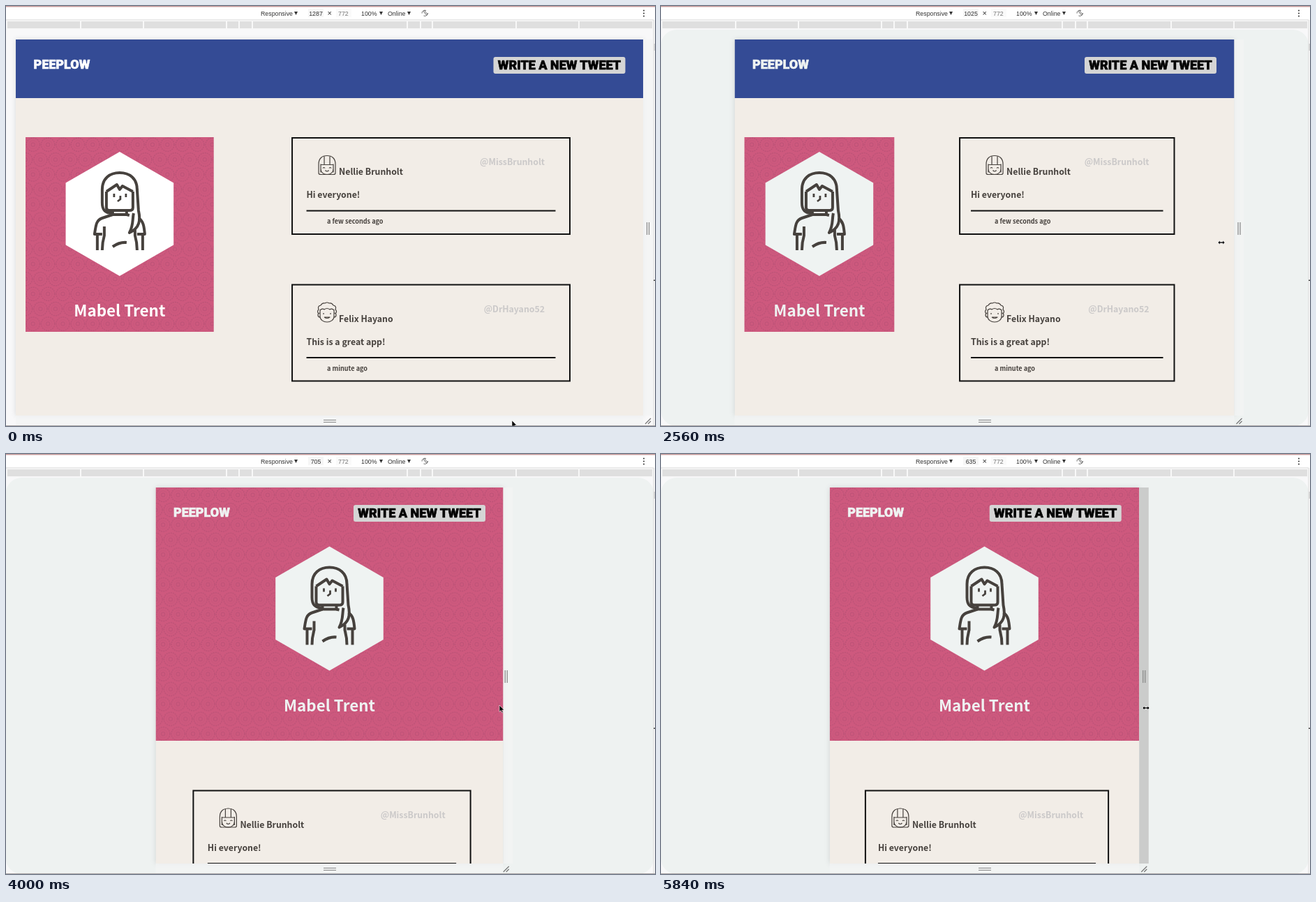
Write an HTML page that moves like this. It is 930 by 602 pixels and loops after 5.92 s.

```html
<!DOCTYPE html>
<html lang="en">
<head>
<meta charset="utf-8">
<title>Responsive page</title>
<style>
  html, body { margin: 0; width: 100%; height: 100%; overflow: hidden; background: #f8f8f9; }
  svg { display: block; position: absolute; left: 0; top: 0; }
  .tool { font: 8.8px "Liberation Sans", Arial, sans-serif; fill: #333; }
  .body { font: 700 12.3px "Noto Sans CJK JP", "Noto Sans CJK SC", "Noto Sans CJK", "Open Sans", sans-serif; fill: #46413d; }
  .body .when { font-size: 9.1px; }
  .body .handle { fill: #cbc9c9; text-anchor: end; }
  .body .person { font-size: 22.4px; text-anchor: middle; }
  .loud { font: 900 18px Roboto, "Open Sans", sans-serif; stroke-width: .6; }
  .ink { fill: none; stroke: #46413d; stroke-linejoin: round; }
</style>
</head>
<body>
<svg width="930" height="602" viewBox="0 0 930 602">
  <defs>
    <pattern id="rosettes" width="21.4" height="42.8" patternUnits="userSpaceOnUse">
      <rect width="22" height="43" fill="#ce597e"/>
      <g id="rings" fill="none" stroke="#b44f73"></g>
    </pattern>
    <clipPath id="screen"><rect id="screenRect" y="48" height="539"/></clipPath>
    <filter id="soft" x="-10%" y="-10%" width="120%" height="120%"><feGaussianBlur stdDeviation="3.5"/></filter>
    <g id="woman" class="ink" stroke-width="4">
      <path d="M-11 88C-22 88-25 82-25 73V54C-25 38-14 30 0 30S25 38 25 54L27 84C30 98 29 109 14 116C20 105 18 98 20 88"/>
      <path d="M-19 57V80Q-19 84-15 84H14Q19 84 19 80V57M-19 57L-4 47L0 54L4 49L19 57M-10 85V90H10V85"/>
      <path d="M-10 90L-25 95C-34 98-34 106-36 118H-25M10 90L14 91M27 95C34 99 35 107 36 118H25"/>
      <path d="M-32 118V141M-22 107V120Q-25 130-25 141M33 118V141M22 112V120Q25 130 25 141M-10 136Q0 129 10 130"/>
      <path d="M-8 60V65M9 60V65M1 63V68L-3 71" stroke-width="2.8"/>
    </g>
    <g id="girl" class="ink" stroke-width="1.2">
      <path d="M-12 11V-2C-12-10-7-14 0-14S12-10 12-2V11Q12 13 9 13H-9Q-12 13-12 11"/>
      <path d="M-9-2V5C-9 10-5 13 0 13S9 10 9 5V-2M-9-1H9M-4-13V-1M4-13V-1M-9 1V10M9 1V10"/>
      <path d="M-6 4Q-4.500 2-3 4M3 4Q4.500 2 6 4M-2.500 7Q0 10 2.500 7"/>
    </g>
    <g id="boy" class="ink" stroke-width="1.2">
      <path d="M-12 2Q-15-1-12-4Q-14-9-9-10Q-7-14-3-13Q0-15 3-13Q7-14 9-10Q14-9 12-4Q15-1 12 2"/>
      <path d="M-10-3Q-7-6-4-4Q0-7 4-4Q7-6 10-3V6C10 11 5 14 0 14S-10 11-10 6ZM-10 1Q-13 1-13 4T-10 7M10 1Q13 1 13 4T10 7"/>
      <path d="M-5 1V3M5 1V3M-4 7H4Q0 10-4 7"/>
    </g>
  </defs>

  <rect width="930" height="602" fill="#f8f8f9"/>
  <rect id="backdrop" y="34" width="928" height="568" rx="22" fill="#eef2f1"/>
  <g id="chrome"></g>
  <g id="view"></g>
</svg>

<script>
const LOOP = 5920, STEP = 80, SCALE = 0.6985, MID = 463.5;
const $ = id => document.getElementById(id);

// [time, device width]
const widths = [[480, 1287], [640, 1283], [1280, 1247], [1840, 1180], [1920, 1167], [2480, 1025],
  [2560, 1025], [3360, 805], [3440, 801], [3760, 757], [3920, 713], [4000, 705], [4400, 666],
  [4720, 643], [4800, 641], [5040, 640], [5360, 635]];
// [time, x, y]
const pointer = [[0, 725, 594], [400, 920, 322], [560, 918, 322], [1280, 896, 325], [1920, 857, 329],
  [2560, 803, 339], [3440, 746, 352], [4000, 707, 360], [4800, 695, 362], [5360, 695, 364]];

function at(keys, t, col = 1) {
  if (t <= keys[0][0]) return keys[0][col];
  const i = keys.findIndex(k => k[0] >= t);
  if (i < 0) return keys[keys.length - 1][col];
  const a = keys[i - 1], b = keys[i];
  return a[col] + (b[col] - a[col]) * (t - a[0]) / (b[0] - a[0]);
}

const rect = (x, y, w, h, fill, more = '') =>
  `<rect x="${x}" y="${y}" width="${w}" height="${h}" fill="${fill}" ${more}/>`;
const text = (x, y, s, more = '') => `<text x="${x}" y="${y}" ${more}>${s}</text>`;
const line = (d, stroke, w, more = '') => `<path d="${d}" fill="none" stroke="${stroke}" stroke-width="${w}" ${more}/>`;
const use = (id, x, y) => `<use href="#${id}" x="${x}" y="${y}"/>`;

$('rings').innerHTML = [[10.7, 10.7], [0, 32.1], [21.4, 32.1]].map(([x, y]) =>
  `<circle cx="${x}" cy="${y}" r="9.6" stroke-width="1.5" stroke-dasharray="2 1.2" opacity=".75"/>
   <circle cx="${x}" cy="${y}" r="6" opacity=".35"/>
   <circle cx="${x}" cy="${y}" r="2.6" stroke-width="1.2" opacity=".6"/>`).join('');

function drawChrome() {
  const down = x => `<path d="M${x - 2.5} 8H${x + 2.5}L${x} 13Z" fill="#333"/>`;
  const stops = [1, 107, 197, 316, 334, 353, 575, 594, 611, 731, 821, 927];
  const bars = stops.slice(1).map((x, i) => rect(stops[i] + 1, 22, x - stops[i] - 2, 10, '#dfdfdf')).join('');
  $('chrome').innerHTML =
    rect(0, 0, 930, 20, '#fff') + rect(0, 0, 930, 1.4, '#c79a9a') + rect(0, 19.5, 928, 1, '#d2d2d2') +
    rect(0, 20.5, 928, 13, '#f8f8f8') + bars +
    rect(433, 4, 22, 12, '#f6f6f6') + rect(473, 4, 22, 12, '#fafafa') +
    `<g class="tool">${text(365, 13.5, 'Responsive')}${text(460.500, 14, '×', 'font-size="11"')}
     ${text(476, 13.5, '772', 'fill="#777"')}${text(509, 13.5, '100%')}${text(547, 13.5, 'Online')}</g>` +
    down(415.5) + down(537.5) + down(577.5) +
    line('M596 10.500A4.300 4.300 0 0 1 602 6.500M604.500 10A4.300 4.300 0 0 1 598.500 14M597.500 7L603 13.500M599 6L604 12', '#666', 1) +
    [6.5, 10.5, 14.5].map(y => `<circle cx="914" cy="${y}" r="1.1" fill="#444"/>`).join('') +
    rect(927.5, 20, 1, 582, '#d6d6d6') + rect(928.5, 20, 2, 582, '#f6f6f6') +
    rect(928.5, 54, 2, 10, '#d0d0d0') + rect(928, 392.5, 2, 1.5, '#444') + rect(0, 601, 930, 1, '#a9a5a5');
}

function tweet(x, y, w, icon, name, handle, message, when) {
  const pad = 0.05 * w + 1.5;
  return rect(x + 1, y + 1, w - 2, 138, 'none', 'stroke="#111" stroke-width="2"') +
    use(icon, x + 51, y + 40.5) +
    text(x + 68, y + 54, name) +
    text(x + w - 37, y + 40, handle, 'class="handle"') +
    text(x + pad, y + 87, message) +
    rect(x + pad, y + 104.500, w - 2 * pad, 2, '#111') +
    text(x + 51, y + 124, when, 'class="when"');
}

function profile(cx, top, white) {
  const hex = [[0, 0], [77.300, 44.500], [77.300, 133.500], [0, 178], [-77.300, 133.500], [-77.300, 44.500]];
  return `<polygon points="${hex.map(([x, y]) => [cx + x, top + y]).join(' ')}" fill="${white}"/>` +
    use('woman', cx, top) + text(cx, top + 236, 'Mabel Trent', `class="person" style="fill:${white}"`);
}

function page(left, w, wide, white) {
  const cardX = wide ? left + 14 : left, cardW = wide ? 0.3 * w : w;
  const tweetX = left + (wide ? 0.4016 * w + 34 : 0.05 * w + 28);
  const tweetW = wide ? 0.4945 * w - 44.6 : 0.9 * w - 49;
  const tweetY = wide ? 188 : 481.5, buttonX = left + w - 214.5;
  const [y, h] = wide ? [188, 279] : [48, 363];
  $('rosettes').setAttribute('patternTransform', `translate(${cardX} ${y})`);
  return rect(left, 48, w, 539, '#f2ede7') +
    (wide ? rect(left, 48, w, 84, '#344b95') : '') +
    rect(cardX, y, cardW, h, 'url(#rosettes)') +
    `<g class="body">${profile(cardX + cardW / 2, wide ? 209 : 132.5, white)}` +
    tweet(tweetX, tweetY, tweetW, 'girl', 'Nellie Brunholt', '@MissBrunholt', 'Hi everyone!', 'a few seconds ago') +
    tweet(tweetX, tweetY + 210.5, tweetW, 'boy', 'Felix Hayano', '@DrHayano52', 'This is a great app!', 'a minute ago') +
    '</g>' + rect(buttonX, 73, 189, 24, '#d5d5d5', 'rx="3"') +
    `<g class="loud">${text(left + 25.5, 89.800, 'PEEPLOW', `fill="${white}" stroke="${white}"`)}
     ${text(buttonX + 94.5, 91.300, 'WRITE A NEW TWEET', 'fill="#000" stroke="#000" text-anchor="middle"')}</g>`;
}

function cursor(t) {
  const arrow = t < 400 || (t >= 3920 && t < 4160);
  const shape = arrow
    ? '<path d="M0 0V9.500L2.200 7.500L3.800 11L5.300 10.300L3.800 7H6.800Z" fill="#000" stroke="#fff" stroke-width=".6"/>'
    : '<path d="M-5 0L-2-3V-1H2V-3L5 0L2 3V1H-2V3Z" fill="#000" stroke="#fff" stroke-width=".6"/>';
  return `<g transform="translate(${at(pointer, t)} ${at(pointer, t, 2)})">${shape}</g>`;
}

function draw(t) {
  const device = at(widths, t), shown = at(widths, t - STEP);
  const w = shown * SCALE, left = MID - w / 2, right = left + w;
  const grip = MID + device * SCALE / 2 + 7;
  const tint = Math.min(1, Math.max(0, (t - 640) / 640));
  const white = tint > 0.5 ? '#eff3f2' : '#fff';
  const hover = (t >= 320 && t < 560) || t >= 5520;

  $('backdrop').setAttribute('opacity', tint);
  $('screenRect').setAttribute('x', left);
  $('screenRect').setAttribute('width', w);
  $('view').innerHTML =
    text(444, 13.5, Math.round(device), 'class="tool" text-anchor="middle"') +
    rect(left, 48, w, 539, '#8a8f90', 'opacity=".3" filter="url(#soft)"') +
    rect(right, 48, 13.500, 539, hover ? '#cbcccb' : '#f3f4f4', hover ? '' : 'opacity=".75"') +
    rect(left, 587, w, 13.500, '#f3f4f4', 'opacity=".75"') +
    `<g clip-path="url(#screen)">${page(left, w, shown > 1024, white)}</g>` +
    line(`M${grip - 1.5} 310V328M${grip + 1.5} 310V328M455 593.500H473M455 596.500H473`, '#858585', 1.2) +
    line(`M${grip - 4} 599L${grip + 4} 591M${grip} 599L${grip + 4} 595`, '#777', 1.2) +
    cursor(t);
}

let last = -1;
function tick(now) {
  const t = Math.floor((now % LOOP) / STEP) * STEP;
  if (t !== last) draw(last = t);
  requestAnimationFrame(tick);
}

drawChrome();
draw(0);
requestAnimationFrame(tick);
</script>
</body>
</html>
```
